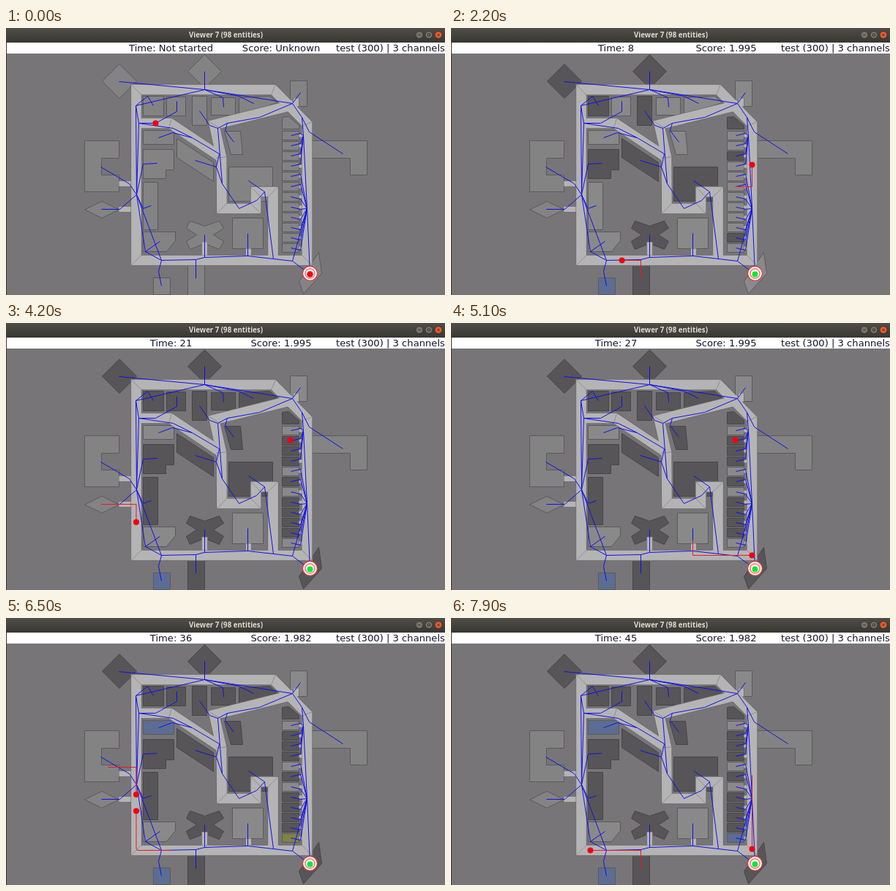
Write an HTML page with a canvas that moves like this. It is 600x366 px and loops after 8000 ms.

```html
<!DOCTYPE html>
<html>
<head>
<meta charset="utf-8">
<style>
html, body { margin: 0; width: 100%; height: 100%; overflow: hidden; background: #777577; }
canvas { display: block; }
</style>
</head>
<body>
<canvas id="stage" width="600" height="366"></canvas>
<script>
const ctx = document.getElementById('stage').getContext('2d');
const LOOP = 8000, STEP = 100, START = 1000;
const SPEED = .45, TRAIL = 225; // px per ms, ms
const ROAD = 14.5, ROOMS = 12;
const RED = '#f00010', FRAME = '#3a3834', INK = '#14142c';
const fills = { unknown: '#848384', light: '#8a898a', dark: '#575557', blue: '#5c6d94', yellow: '#7f8246' };

const points = text => text.split(' ').map(p => p.split(',').map(Number));
const box = (x1, y1, x2, y2) => [[x1, y1], [x2, y1], [x2, y2], [x1, y2]];
const diamond = (x, y, rx, ry) => [[x - rx, y], [x, y - ry], [x + rx, y], [x, y + ry]];
const distance = (a, b) => Math.hypot(b[0] - a[0], b[1] - a[1]);
const mix = (a, b, k) => [a[0] + (b[0] - a[0]) * k, a[1] + (b[1] - a[1]) * k];
const clamp = (v, max) => Math.max(0, Math.min(max, v));

// Road centre lines
const ring = points('177.5,84 365,84 411,131 411,318 177.5,318');
const lanes = ['177,130 224,130 294,177', '392,105 284,132 294,177 294.5,247 341,247 341,224 364.5,224 364.5,318'].map(points);

// Navigation graph
const hubs = {
  top: [271, 84], ne: [391, 103], nw: [177, 106], west: [178, 228], sw: [212, 318], south: [259, 317],
  cross: [271, 314], court: [330, 312], join: [365, 316], se: [391, 319], east: [411, 247], base: [415, 337],
  bay: [404, 122], row: [406, 147], gate: [181, 130], lane: [228, 137], bend: [254, 150], fork: [291, 172],
  mid: [287, 190], dip: [295, 213], turn: [318, 247], rise: [342, 236], crook: [353, 224], split: [289, 137],
  hill: [302, 130], slope: [346, 122]
};
const links = [
  'ne top nw west sw south cross court join se base east se', 'nw gate west', 'ne bay row east',
  'gate lane bend fork mid dip turn rise crook join', 'dip split hill slope ne'
].map(names => names.split(' ').map(n => hubs[n]));

// States a building passes through: [time, fill]
const explored = fill => [[START, fill]];
const dark = explored('dark'), light = explored('light'), late = [...light, [2800, 'dark']];
const buildings = [];
function add(shape, states, hub, way) {
  buildings.push({ shape, states: [[0, 'unknown'], ...states] });
  if (hub) links.push([hubs[hub], ...points(way)]);
}

add(diamond(154.5, 72.5, 23.5, 23.5), dark, 'top', '154,73');
add(diamond(271, 59, 23, 23), dark, 'top', '271,59');
add(box(388, 72, 411, 107), light, 'ne', '402,88');
add(box(187, 93, 215, 120), dark, 'nw', '193,93 201,106');
add(box(219, 94, 245, 120), late, 'gate', '204,130 233,114 233,100');
add(box(254, 93, 274, 133), dark, 'split', '278,133 264,113');
add(box(280, 95, 313, 119), late, 'top', '296,95 297,108');
add(points('318,95 360,93 370,102 318,119'), late, 'top', '318,93 338,103');
add(points('298,141 320,141 323,173 307,173'), late, 'hill', '299,140 311,156');
add(box(187, 140, 229, 159), [...light, [5600, 'blue']], 'bend', '227,143 208,150');
add(points('187,166 229,166 229,194 218,194 218,206 187,206'), dark, 'west', '187,186 206,185');
add(points('233,151 283,184 283,210 233,177'), dark, 'mid', '258,181');
add(points('107,154 154,154 154,178 130,178 130,201 154,201 154,224 107,224'), [], 'west', '168,213 129,190');
add(diamond(130.5, 248.5, 23.5, 11.5), [], 'west', '155,248 130,248');
add(box(187, 211, 207, 276), late, 'west', '187,247 198,243');
add(points('187,279 231,279 231,291 219,306 187,306'), light, 'sw', '190,306 210,292');
add(points('246,274 251,264 271,271 291,264 297,274 283,283 297,292 291,303 271,295 251,303 246,292 260,283'),
  dark, 'cross', '271,283');
add(box(304, 190, 364, 237), dark, 'crook', '331,209');
add(box(309, 260, 351, 302), light, 'court', '330,281');
add(points('414,154 493,154 493,201 470,201 470,178 414,178'), [], 'bay', '414,142 460,172');
add(box(201, 342, 224, 365), [[START, 'yellow'], [1900, 'blue']], 'sw', '208,333 212,353');
add(box(248, 321, 271, 366), dark, 'south', '259,343');
add(points('427,307 431,336 406,364 400,347'), late);
add(points('377,122 386,121 400,133 400,138 377,138'), dark);
links.push([hubs.west, [190, 306]]);

const doors = ['271,293 271,311', '331,302 331,311', '154,213 170,213', '154,248 170,248', '396,96 396,107'].map(points);
for (let k = 0; k < ROOMS; k++) {
  const y = 141 + 14 * k;
  const states = k === ROOMS - 1 ? [...light, [6200, 'yellow'], [7200, 'blue']]
    : k % 8 === 2 ? dark
    : [0, 4, 6].includes(k) ? light : late;
  add(box(377, y, 400, y + 12), states, k < 4 ? 'row' : 'east', `402,${y + (k < 6 ? 3 : 9)} 389,${y + 6}`);
  doors.push([[400, y + 6], [404, y + 6]]);
}

// Walking along the ring, measured from its first corner
const sides = ring.map((a, i) => ({ a, b: ring[(i + 1) % ring.length] }));
let perimeter = 0;
for (const side of sides) {
  side.start = perimeter;
  side.size = distance(side.a, side.b);
  perimeter += side.size;
}
function onRing(s) {
  s = (s + perimeter) % perimeter;
  const side = sides.find(d => s <= d.start + d.size) || sides[0];
  return mix(side.a, side.b, (s - side.start) / side.size);
}
function nearest(p) {
  const found = sides.map(({ a, b, start, size }) => {
    const along = clamp(((p[0] - a[0]) * (b[0] - a[0]) + (p[1] - a[1]) * (b[1] - a[1])) / size, size);
    return { s: start + along, gap: distance(p, mix(a, b, along / size)) };
  });
  return found.sort((m, n) => m.gap - n.gap)[0].s;
}
function route(from, to) {
  const s = nearest(from);
  const way = (nearest(to) - s + 1.5 * perimeter) % perimeter - perimeter / 2;
  const count = Math.ceil(Math.abs(way) / 4) + 1;
  return [from, ...Array.from({ length: count + 1 }, (_, i) => onRing(s + way * i / count)), to];
}

// Stops of each agent: x,y,departure
const agents = [
  '204,130,1150 259,343,2087 212,353,2330 387,203,3227 388,160,5200 139,204,6331 259,343,7691 139,204,9000',
  '415,337,1200 388,217,2082 402,88,3013 130,248,4040 330,281,4838 415,337,5820 177,150,6756 350,84,7310 415,337,9000'
].map(text => {
  const stops = points(text);
  return stops.slice(1).map((stop, i) => ({ leave: i ? stops[i][2] : 0, go: stops[i][2], path: route(stops[i], stop) }));
});

function walked(path, from, to) {
  const part = [];
  let done = 0;
  path.slice(1).forEach((b, i) => {
    const a = path[i], size = distance(a, b);
    if (size && done + size >= from && done <= to)
      part.push(mix(a, b, clamp((from - done) / size, 1)), mix(a, b, clamp((to - done) / size, 1)));
    done += size;
  });
  return part;
}

function trace(shape, closed) {
  ctx.beginPath();
  shape.forEach(([x, y]) => ctx.lineTo(x + .5, y + .5));
  if (closed) ctx.closePath();
}

function line(shape, colour, width = 1, closed = false) {
  trace(shape, closed);
  ctx.strokeStyle = colour;
  ctx.lineWidth = width;
  ctx.stroke();
}

function disc(x, y, r, colour) {
  ctx.beginPath();
  ctx.arc(x, y, r, 0, 2 * Math.PI);
  ctx.fillStyle = colour;
  ctx.fill();
}

function bar(y, height, colour) {
  ctx.fillStyle = colour;
  ctx.fillRect(0, y, 600, height);
}

function label(text, x, y, font, colour) {
  ctx.font = font;
  ctx.fillStyle = colour;
  ctx.textAlign = 'center';
  ctx.fillText(text, x, y);
}

// Line across the road along the bisector of a corner
function seam(a, p, b) {
  const normal = (m, n) => [(m[1] - n[1]) / distance(m, n), (n[0] - m[0]) / distance(m, n)];
  const u = normal(a, p), v = normal(p, b);
  const k = ROAD / 2 / (1 + u[0] * v[0] + u[1] * v[1]);
  const dx = (u[0] + v[0]) * k, dy = (u[1] + v[1]) * k;
  line([[p[0] - dx, p[1] - dy], [p[0] + dx, p[1] + dy]], '#858485', .8);
}

function drawMap(t) {
  bar(0, 366, '#777577');
  for (const { shape, states } of buildings) {
    const state = states.filter(s => s[0] <= t).pop()[1];
    trace(shape, true);
    ctx.fillStyle = fills[state];
    ctx.fill();
    line(shape, state === 'dark' ? '#474647' : '#5b5a5b', 1, true);
  }
  for (const [colour, extra] of [['#6b6a6b', .8], ['#b5b4b5', -.8]]) {
    line(ring, colour, ROAD + extra, true);
    lanes.forEach(l => line(l, colour, ROAD + extra));
    doors.forEach(d => line(d, colour, (d[1][0] === 404 ? 5 : 8) + extra));
  }
  ring.forEach((p, i) => seam(ring.at(i - 1), p, ring[(i + 1) % ring.length]));
  lanes.forEach(l => l.slice(1, -1).forEach((p, i) => seam(l[i], p, l[i + 2])));
  links.forEach(l => line(l, '#1010e8'));
}

function drawBase(t) {
  const { base: [x, y] } = hubs;
  disc(x + .5, y - .5, 10.5, '#e33b3b');
  disc(x + .5, y - .5, 9.3, '#fff');
  ctx.beginPath();
  ctx.arc(x + .5, y - .5, 6.5, 0, 2 * Math.PI);
  ctx.strokeStyle = '#f09090';
  ctx.lineWidth = 2;
  ctx.stroke();
  disc(x + .5, y + .5, 4, t < 1500 ? RED : '#10e830');
}

function drawAgent(trips, t) {
  const { go, path } = trips.filter(trip => trip.leave <= t).pop();
  const here = Math.max(0, t - go) * SPEED;
  const trail = walked(path, Math.max(0, here - TRAIL * SPEED), here);
  if (trail.length) line(trail, '#f01420');
  const [x, y] = trail.at(-1) || path.at(-1);
  if (t < 1500 || distance([x, y], hubs.base) > 2) disc(x + .5, y + .5, 4, RED);
}

function drawHeader(t) {
  const shade = ctx.createLinearGradient(0, 0, 0, 19);
  shade.addColorStop(0, '#504e48');
  shade.addColorStop(1, FRAME);
  bar(0, 20, shade);
  bar(20, 15, '#fff');
  ctx.fillStyle = FRAME;
  ctx.fillRect(0, 19, 1, 347);
  label('Viewer 7 (98 entities)', 300.5, 12.5, 'bold 9.7px "Open Sans", sans-serif', '#dfdbd2');

  [565, 578, 591].forEach((x, i) => {
    disc(x, 9.5, 5.3, '#33312d');
    disc(x, 9.5, 4.6, i === 2 ? '#e9592b' : '#75726a');
  });
  line([[563, 9], [566, 9]], FRAME);
  line(box(576, 7.5, 579, 10.5), FRAME, 1, true);
  line([[589, 7.5], [592, 10.5]], FRAME);
  line([[592, 7.5], [589, 10.5]], FRAME);

  const clock = t < START ? 'Not started' : Math.floor(.00635 * t - 4.98);
  const score = t < START ? 'Unknown' : t < 1900 ? '1.993' : t < 5600 ? '1.995' : '1.982';
  const font = '13.15px "DejaVu Sans", sans-serif';
  label('Time: ' + clock, 225.5, 31.5, font, INK);
  label('Score: ' + score, 376, 31.5, font, INK);
  label('test (300) | 3 channels', 525.5, 31.5, font, INK);
}

function frame(now) {
  const t = Math.floor(now % LOOP / STEP) * STEP;
  drawMap(t);
  drawBase(t);
  agents.forEach(trips => drawAgent(trips, t));
  drawHeader(t);
  requestAnimationFrame(frame);
}
requestAnimationFrame(frame);
</script>
</body>
</html>
```
